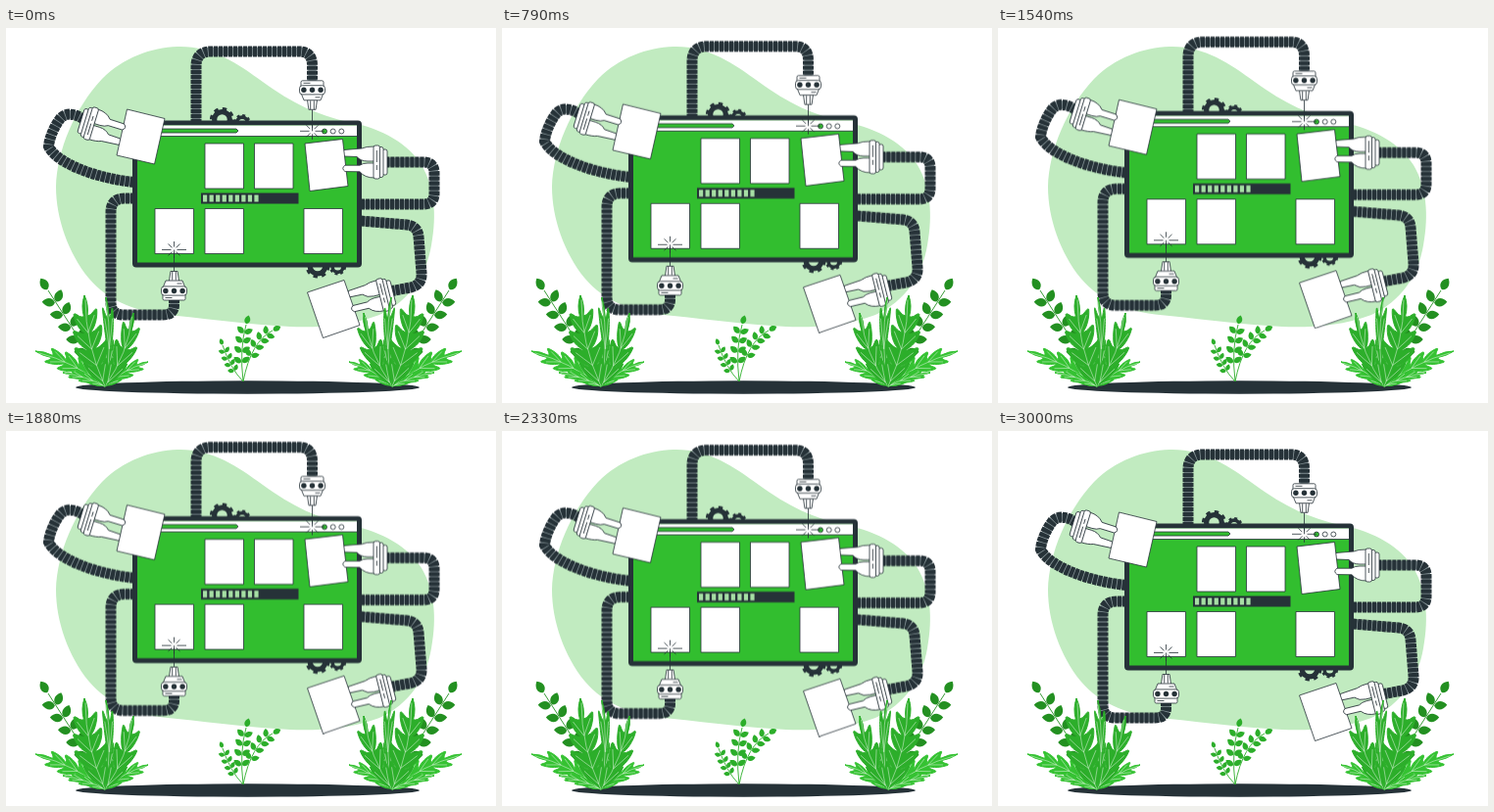
Recreate the animation shown at these times as an HTML page. Size 500 by 383 pixels, loop 3.04 s.

```html
<!DOCTYPE html>
<html lang="en">
<head>
<meta charset="utf-8">
<title>Website assembly</title>
<style>
  html, body { margin: 0; width: 100%; height: 100%; overflow: hidden; background: #fff; }
  svg { display: block; width: 100%; height: 100%; }
  .float { animation: float 3040ms linear infinite; }
  @keyframes float {
    0%, 98.68%, 100% { transform: translateY(0); }
    49.34% { transform: translateY(-10px); }
  }
  .dark { fill: #263238; }
  .paper { fill: #fff; stroke: #263238; stroke-width: .8; stroke-linejoin: round; }
  .line { fill: none; stroke: #263238; stroke-width: .8; }
  .core { fill: none; stroke: #829094; stroke-width: 8.4; }
  .ridge { fill: none; stroke: #263238; stroke-width: 11; stroke-dasharray: 4.2 .8; }
  .gear { fill: none; stroke: #263238; }
  .vein { fill: none; stroke: #d9f3d8; stroke-width: .55; }
</style>
</head>
<body>
<svg viewBox="0 0 500 383">
  <defs>
    <g id="nozzle">
      <path class="line" d="M0 20V42"/>
      <path class="paper" d="M-5 10H5L3.600 20H-3.600Z"/>
      <path class="line" d="M-1.800 11V20M1.800 11V20"/>
      <rect class="paper" x="-11.500" y="-9.500" width="23" height="8" rx="1.500"/>
      <path class="paper" d="M-11.500 3H11.500L8.500 10.500H-8.500Z"/>
      <rect class="paper" x="-13" y="-4.600" width="26" height="9.200" rx="3"/>
      <path class="line" d="M-9 -7H-2M3 7.500H8"/>
      <g class="dark"><circle cx="-8.600" r="2.700"/><circle r="2.700"/><circle cx="8.600" r="2.700"/></g>
      <g id="spark" transform="translate(0 42)"></g>
    </g>
    <path id="backFinger" class="paper" d="M13 -16Q22 -16 26 -14L44 -12.500Q47 -9 44 -6L31 -5.500Q27 -1 20 -1H13Z"/>
    <g id="clamp">
      <path class="paper" d="M13 1H20Q25 1 28 3.200L43 3.200Q47.500 6.300 43 9.600L28 9.800Q23 16 13 16Z"/>
      <rect class="paper" x="0" y="-13" width="5" height="26" rx="2"/>
      <rect class="paper" x="4" y="-15.500" width="5" height="31" rx="2"/>
      <rect class="paper" x="7.500" y="-17" width="6.500" height="34" rx="2"/>
      <path class="line" d="M10.700 -12V0M10.700 3V8"/>
    </g>
  </defs>

  <path fill="#c1ebc0" d="M175 19C210 18 236 36 262 55C292 77 318 89 350 96C385 103 410 118 424 140C437 162 440 190 434 222C429 252 412 279 381 293C350 305 315 306 290 305C250 303 215 298 175 294C135 291 105 280 84 255C64 230 51 195 51 162C52 125 70 82 98 52C120 30 148 20 175 19Z"/>
  <ellipse class="dark" cx="246.500" cy="367" rx="175.500" ry="6.700"/>

  <g class="float">
    <g id="gears"></g>
    <g id="pipes"></g>

    <rect class="dark" x="129" y="94.500" width="234" height="150" rx="4"/>
    <rect x="134" y="99.500" width="224" height="140" fill="#32be2f"/>
    <rect x="134" y="99.500" width="224" height="11" fill="#fff"/>
    <path class="line" d="M134 110.500H358"/>
    <path d="M150 103H235L237 105L235 107H150Z" fill="#32be2f" stroke="#263238" stroke-width=".8"/>
    <g stroke="#263238" stroke-width=".8" fill="#fff">
      <circle cx="325" cy="105.500" r="2.500" fill="#32be2f"/>
      <circle cx="333.700" cy="105.500" r="2.500"/>
      <circle cx="342.300" cy="105.500" r="2.500"/>
    </g>
    <g id="tiles"></g>
    <rect class="dark" x="199" y="168.500" width="99.500" height="11"/>
    <g id="progress" fill="#a6dfa4"></g>

    <use href="#backFinger" transform="translate(389 137) scale(-1 1)"/>
    <path class="paper" d="M305 118L343.500 113.500L349 161.500L310 166.500Z"/>
    <use href="#clamp" transform="translate(389 137) scale(-1 1)"/>

    <use href="#backFinger" transform="translate(76.500 94.500) rotate(17) scale(1 -1)"/>
    <path class="paper" d="M123.500 83L162 92.500L151.500 139L113 130Z"/>
    <use href="#clamp" transform="translate(76.500 94.500) rotate(17) scale(1 -1)"/>

    <use href="#backFinger" transform="translate(395 270) rotate(-14) scale(-1 1)"/>
    <path class="paper" d="M307.500 270L345 257.500L361 303.500L323.500 316.500Z"/>
    <use href="#clamp" transform="translate(395 270) rotate(-14) scale(-1 1)"/>

    <use href="#nozzle" transform="translate(312.500 63.300)"/>
    <use href="#nozzle" transform="translate(171.500 268.500) scale(1 -1)"/>
  </g>

  <g id="plants"></g>
</svg>
<script>
  const put = (id, html) => { document.getElementById(id).innerHTML = html; };
  const range = (n, f) => Array.from({ length: n }, (_, i) => f(i)).join('');
  const fix = v => v.toFixed(2);

  put('spark', range(8, i => {
    const a = i * Math.PI / 4, c = Math.cos(a), s = Math.sin(a);
    const r = i % 4 === 0 ? 12.5 : 8.5;
    return `<path class="line" d="M${fix(c * 3)} ${fix(s * 3)}L${fix(c * r)} ${fix(s * r)}"/>`;
  }));

  put('pipes', [
    'M194 97V39Q194 24 209 24H299Q312.500 24 312.500 38V54',
    'M79 93C70 87 60 86 55 93C49 101 44 113 43.500 121C52 139 95 154 131 157.500',
    'M131 174H121Q107 174 107 188V280Q107 293 120 293H160Q171.500 293 171.500 283V277',
    'M362 180H426Q437 180 437 169V148Q437 137 426 137H388',
    'M362 197L409 201Q420 202 421 213L424 250Q425 262 413 265L394 268.500'
  ].map(d => `<path class="core" d="${d}"/><path class="ridge" d="${d}"/>`).join(''));

  function gear(x, y, r, teeth) {
    const pitch = 2 * Math.PI * r * 0.88 / teeth;
    return `<circle class="gear" cx="${x}" cy="${y}" r="${r * 0.63}" stroke-width="${r * 0.42}"/>
      <circle class="gear" cx="${x}" cy="${y}" r="${r * 0.88}" stroke-width="${r * 0.25}"
        stroke-dasharray="${pitch * 0.5} ${pitch * 0.5}"/>`;
  }
  put('gears', gear(220.5, 93.5, 12.5, 8) + gear(241, 96.5, 8.5, 8) +
    gear(318, 243, 12.5, 8) + gear(338.5, 244, 8.5, 8));

  put('tiles', [[203, 118], [253.5, 118], [152, 184.5], [203, 184.5], [304, 184.5]]
    .map(([x, y]) => `<rect class="paper" x="${x}" y="${y}" width="39.5" height="46"/>`).join(''));
  put('progress', range(9, i => `<rect x="${201 + i * 6.55}" y="170.5" width="4.2" height="7"/>`));

  // Leaf with finger-like lobes on both sides of a bowed midrib.
  function lobed(x0, y0, x1, y1, bow, w, n, fill) {
    const dx = x1 - x0, dy = y1 - y0, len = Math.hypot(dx, dy);
    const raw = (t, off) => `${fix(x0 + dx * t - dy / len * off)} ${fix(y0 + dy * t + dx / len * off)}`;
    const at = (t, off) => raw(t, bow * 4 * t * (1 - t) + off);
    const half = t => w * Math.pow(1 - t, 0.55) * Math.min(1, 0.5 + t * 2);
    const step = 0.72 / n, mid = raw(0.5, bow * 2);
    let body = '', veins = `M${raw(0, 0)}Q${mid} ${raw(0.95, 0)}`;
    for (const s of [-1, 1]) {
      body += `M${raw(0, 0)}`;
      for (let i = 0; i < n; i++) {
        const t = 0.06 + step * i, p = half(t) * s, next = t + step;
        const tip = t + step * 1.25;
        body += `L${at(t, p * 0.22)}C${at(t + step * 0.15, p * 0.6)} ${at(tip - step * 0.5, p)} ${at(tip, p)}` +
          `C${at(tip + step * 0.15, p * 0.85)} ${at(next - step * 0.05, p * 0.6)} ${at(next, half(next) * s * 0.22)}`;
        veins += `M${at(t, 0)}Q${at(t + step * 0.5, p * 0.4)} ${at(t + step * 0.95, p * 0.75)}`;
      }
      body += `Q${at(0.9, half(0.8) * s * 0.5)} ${raw(1, 0)}Q${mid} ${raw(0, 0)}Z`;
    }
    return `<path d="${body}" fill="${fill}" stroke="${fill}" stroke-linejoin="round"/>
      <path class="vein" d="${veins}"/>`;
  }

  // Curved stem with paired oval leaves and one at the end.
  function sprig(x0, y0, cx, cy, x1, y1, from, pairs, size, fill) {
    const leaf = (x, y, deg) => `<path transform="translate(${fix(x)} ${fix(y)}) rotate(${fix(deg)}) scale(${size})"
      d="M.1 0C.2 -.4 .75 -.5 1.15 0C.8 .48 .25 .42 .1 0Z"/>`;
    const leaves = range(pairs + 1, i => {
      const t = from + (1 - from) * i / pairs, u = 1 - t;
      const x = u * u * x0 + 2 * u * t * cx + t * t * x1;
      const y = u * u * y0 + 2 * u * t * cy + t * t * y1;
      const deg = Math.atan2(u * (cy - y0) + t * (y1 - cy), u * (cx - x0) + t * (x1 - cx)) * 180 / Math.PI;
      return i === pairs ? leaf(x, y, deg) : leaf(x, y, deg - 54) + leaf(x, y, deg + 54);
    });
    return `<path d="M${x0} ${y0}Q${cx} ${cy} ${x1} ${y1}" fill="none" stroke="${fill}" stroke-width=".9"/>
      <g fill="${fill}">${leaves}</g>`;
  }

  const bright = '#35c232', mid = '#2cae2a', deep = '#239021';
  const bush =
    lobed(101, 366, 30, 330, 4, 13, 4, bright) +
    lobed(101, 366, 145, 341, -3, 9, 3, bright) +
    lobed(101, 366, 58, 352, 2, 6, 3, bright) +
    sprig(100, 356, 71, 312, 43, 268, 0.28, 5, 12.5, deep) +
    lobed(101, 366, 102, 275, 4, 7, 2, mid) +
    lobed(101, 366, 130, 291, 5, 14, 3, mid) +
    lobed(101, 366, 80, 273, -5, 20, 4, mid);

  put('plants', `<g>${bush}</g><g transform="translate(495 0) scale(-1 1)">${bush}</g>` +
    sprig(242, 361, 238, 328, 245, 303, 0.3, 4, 8.5, mid) +
    sprig(242, 361, 250, 320, 272, 309, 0.36, 4, 8, mid) +
    sprig(242, 361, 229, 348, 221, 324, 0.36, 4, 6.2, mid));
</script>
</body>
</html>
```
